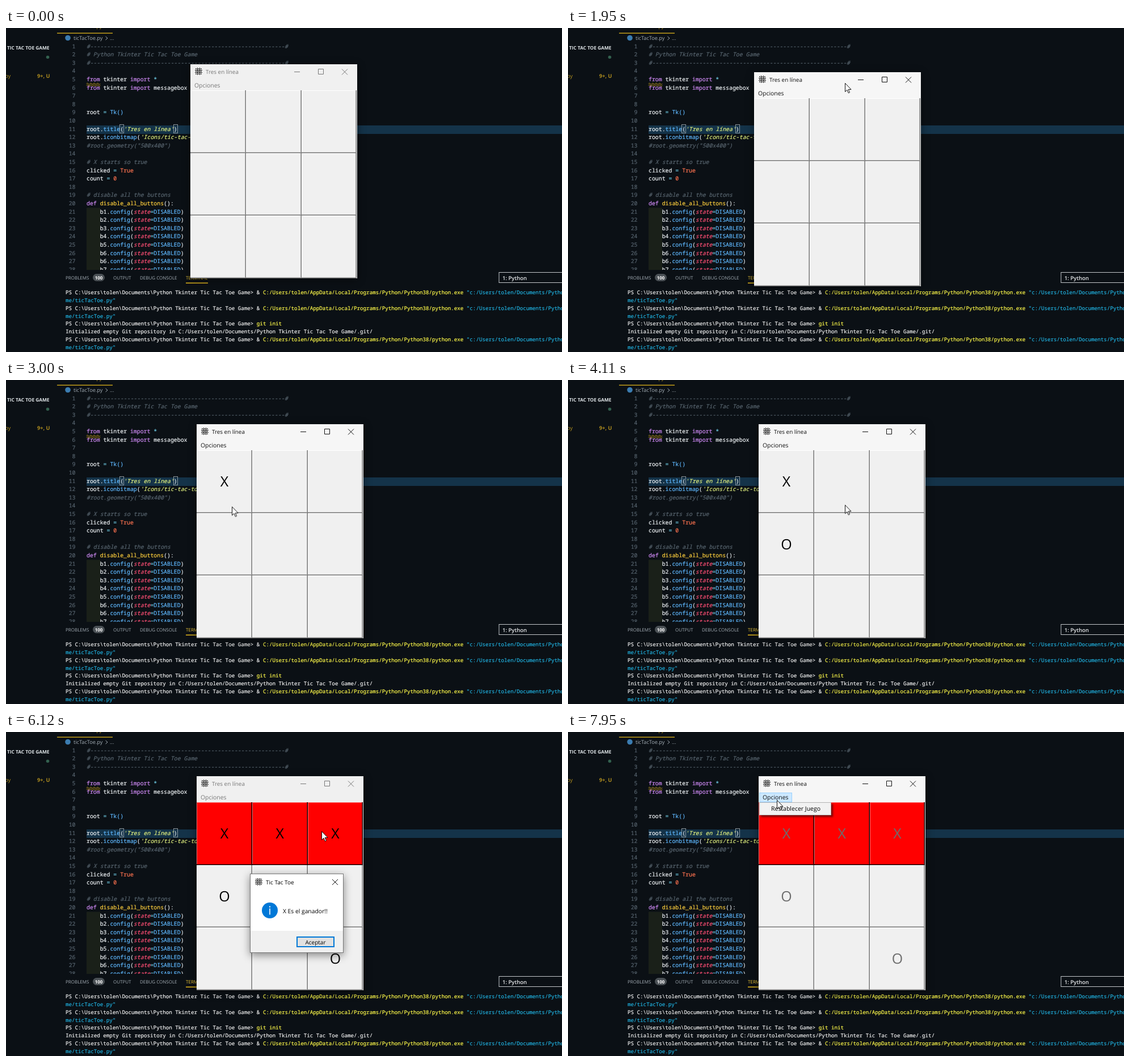
These frames come from a looping animation (980 by 572 pixels, 8 s). An HTML page:

```html
<!DOCTYPE html>
<html lang="es">
<head>
<meta charset="utf-8">
<title>Tres en línea</title>
<style>
html, body { margin: 0; width: 100%; height: 100%; overflow: hidden; background: #0b1015; }
body { position: relative; text-rendering: geometricPrecision; font-family: "Open Sans", "Noto Sans", sans-serif; }
svg, pre, .box { position: absolute; margin: 0; }
svg { left: 0; top: 0; overflow: visible; }
pre { font-family: "Noto Sans Mono", "DejaVu Sans Mono", monospace; -webkit-text-stroke: .2px; }

/* editor */
.code { font-size: 9.87px; line-height: 14.6px; top: 24.7px; height: 402.3px; overflow: hidden; color: #eef2f5; }
#nums { left: 90px; width: 32.5px; text-align: right; color: #56636e; }
#src { left: 142px; width: 838px; }
.c { color: #58656f; font-style: italic; }
.k { color: #cf8af5; }
.f { color: #5fb8ff; }
.s { color: #e0f07f; font-style: italic; }
.y { color: #ffcf3d; }
.p { color: #ff4f75; font-style: italic; }
.n { color: #ff7350; }
.o { color: #74d6f0; }
.b { outline: 1px solid #8b979f; }

/* terminal */
#term { left: 105px; top: 460px; width: 875px; height: 112px; overflow: hidden; font-size: 9.21px; line-height: 13.85px; color: #f0f0f0; }
#term b { font-weight: 400; color: #fffa4a; }
#term u { text-decoration: none; color: #20b0de; }

/* game window */
.box { left: 0; top: 0; }
#win { width: 293.5px; height: 378px; background: #f0f0f0; box-shadow: 0 3px 14px rgba(0,0,0,.45); animation: drag 8s linear infinite; }
#bar { width: 293.5px; height: 46px; animation: bar 8s step-end infinite; }
#bar svg { fill: currentColor; stroke: none; }
.line { fill: none; stroke: currentColor; }
#board { top: 46px; display: grid; grid: repeat(3, 110.67px) / repeat(3, 97.83px); font-size: 25px; line-height: 111px; text-align: center; animation: fade 8s step-end infinite; }
#board div { box-shadow: inset -1px -1px #757575, inset -2px -2px #b0b0b0, inset 1px 1px #fff; }
#board .r { animation: red 8s step-end infinite; }
#board span, #dlg, #hot, #menu { animation: 8s step-end infinite; }
#board .m1 { animation-name: m1; }
#board .m2 { animation-name: m2; }
#board .m3 { animation-name: m3; }
#board .m4 { animation-name: m4; }
#board .m9 { animation-name: m9; }

#hot { left: 1px; top: 29px; width: 56px; height: 15px; background: #cce8ff; border: 1px solid #99d1ff; animation-name: hot; }
#menu { left: 1px; top: 46px; width: 125px; height: 21px; background: #f2f2f2; border: 1px solid #b4b4b4; box-shadow: 3px 3px 3px rgba(0,0,0,.5); animation-name: menu; }

#dlg { left: 430px; top: 250px; width: 163px; height: 138px; border: 1px solid #777; background: linear-gradient(#fff 100px, #f0f0f0 0); box-shadow: 0 4px 14px rgba(0,0,0,.45); animation-name: dlg; }
#ok { left: 81px; top: 110px; width: 63px; height: 15px; border: 2px solid #0078d7; background: #e1e1e1; font-size: 10px; line-height: 16px; text-align: center; animation: ok 8s step-end infinite; }
#cur { width: 12px; height: 19px; animation: move 8s linear infinite; }

@keyframes drag {
  0%, 15% { transform: translate(325px, 64px); }
  23.6%, 24.5% { transform: translate(328px, 78px); }
  27.5%, 100% { transform: translate(336px, 78px); }
}
@keyframes bar {
  0%, 75.4% { color: #777; background: #f0f0f0; }
  13.9%, 88.5%, 100% { color: #111; background: #f6f6f6; }
}
@keyframes fade { 0% { color: #000; } 88.5%, 100% { color: #6d6d6d; } }
@keyframes red {
  0% { background: #f0f0f0; }
  73.2%, 100% { background: #f00; box-shadow: inset -1px -1px #000, inset -2px -2px #900, inset 1px 1px #ff7070; }
}
@keyframes m1 { 0% { opacity: 0; } 32.2%, 100% { opacity: 1; } }
@keyframes m4 { 0% { opacity: 0; } 43.8%, 100% { opacity: 1; } }
@keyframes m2 { 0% { opacity: 0; } 54%, 100% { opacity: 1; } }
@keyframes m9 { 0% { opacity: 0; } 65.3%, 100% { opacity: 1; } }
@keyframes m3 { 0% { opacity: 0; } 73%, 100% { opacity: 1; } }
@keyframes dlg { 0%, 88.5%, 100% { opacity: 0; } 75.4% { opacity: 1; } }
@keyframes ok { 0% { background: #e1e1e1; } 85.5%, 100% { background: #e5f1fb; } }
@keyframes hot { 0% { opacity: 0; } 96%, 100% { opacity: 1; } }
@keyframes menu { 0% { opacity: 0; } 97.9%, 100% { opacity: 1; } }
@keyframes move {
  0%, 2.6% { transform: translate(990px, 580px); }
  2.63% { transform: translate(966px, 556px); }
  3.4% { transform: translate(800px, 330px); }
  4.1% { transform: translate(560px, 130px); }
  4.9% { transform: translate(384px, 62px); }
  5.5% { transform: translate(440px, 48px); }
  6%, 15% { transform: translate(485px, 83px); }
  23.6%, 24.5% { transform: translate(488px, 97px); }
  27.5%, 28.5% { transform: translate(496px, 97px); animation-timing-function: ease-in-out; }
  31.5%, 36% { transform: translate(380px, 165px); }
  37.5% { transform: translate(398px, 223px); }
  39.4%, 45.5% { transform: translate(405px, 277px); }
  51% { transform: translate(488px, 229px); }
  51.4% { transform: translate(488px, 220px); }
  53.5%, 57% { transform: translate(488px, 200px); animation-timing-function: ease-in-out; }
  64%, 67.4% { transform: translate(572px, 390px); }
  70.1% { transform: translate(562px, 244px); }
  72%, 77.6% { transform: translate(556px, 175px); }
  78.3% { transform: translate(552px, 164px); }
  82% { transform: translate(432px, 290px); }
  86.5%, 88.8% { transform: translate(545px, 372px); animation-timing-function: ease-in-out; }
  96.4%, 100% { transform: translate(368px, 120px); }
}
</style>
</head>
<body>
<svg width="980" height="572" fill="#a3adb5">
  <defs>
    <g id="icon" fill="none" stroke="#222">
      <path d="M4.5 0V13M8.5 0V13M0 4.5H13M0 8.5H13"/>
      <path d="M1 2H12M1 6.5H12M1 11H12" stroke-width="1.6" stroke-dasharray="2 2.4"/>
    </g>
  </defs>
  <path fill="#143349" d="M142 172H980V187H142Z"/>
  <path fill="#1a2019" d="M142 317.5H166V427H142Z"/>
  <path fill="#e5b91c" d="M90 8.5H188V9.7H90ZM317 449.5H356V451H317Z"/>
  <text x="118" y="-.3" font-size="9.2" fill="#b8961f">ticTacToe.py</text>
  <circle cx="109" cy="17.5" r="4.8" fill="#3b7cb0"/>
  <text x="119" y="21" font-size="9.2">ticTacToe.py</text>
  <path d="M175.5 15L179 18 175.5 21" fill="none" stroke="#a3adb5"/>
  <text x="183" y="21" font-size="9.2">...</text>
  <text x="2" y="38.2" font-size="8.3" font-weight="700" fill="#e0e5e8">TIC TAC TOE GAME</text>
  <circle cx="73.5" cy="51.5" r="2.8" fill="#33614f"/>
  <g fill="#b08e1f">
    <text x="-2" y="88" font-size="9.4">py</text>
    <text x="55" y="88.3" font-size="9.2" font-weight="700">9+, U</text>
  </g>
  <g font-size="8">
    <text x="105" y="444">PROBLEMS</text>
    <text x="189" y="444">OUTPUT</text>
    <text x="236" y="444">DEBUG CONSOLE</text>
    <text x="317" y="444" fill="#f0c93a">TERMINAL</text>
    <rect x="153" y="434" width="21" height="13" rx="6.5" fill="#4b5156"/>
    <text x="163.5" y="443.5" text-anchor="middle" font-weight="700" fill="#fff">100</text>
  </g>
  <rect x="869" y="431.5" width="120" height="18" fill="none" stroke="#c4c8cb"/>
  <text x="875" y="444.5" font-size="9.5" font-weight="600" fill="#e8eaec">1: Python</text>
</svg>

<pre class="code" id="nums"></pre>
<pre class="code" id="src"><span class="c">#----------------------------------------------------------#
# Python Tkinter Tic Tac Toe Game
#----------------------------------------------------------#</span>

<span class="k">from</span> tkinter <span class="k">import</span> <span class="o">*</span>
<span class="k">from</span> tkinter <span class="k">import</span> messagebox


root <span class="o">=</span> <span class="f">Tk()</span>

root.<span class="f">title</span><span class="b">(</span><span class="s">'Tres en línea'</span><span class="b">)</span>
root.<span class="f">iconbitmap</span>(<span class="s">'Icons/tic-tac-toe.ico'</span>)
<span class="c">#root.geometry("500x400")</span>

<span class="c"># X starts so true</span>
clicked <span class="o">=</span> <span class="n">True</span>
count <span class="o">=</span> <span class="n">0</span>

<span class="c"># disable all the buttons</span>
<span class="k">def</span> <span class="y">disable_all_buttons</span>():
</pre>
<svg width="980" height="572" fill="none" stroke="#d9ae1c">
  <path id="wave" d="M142 98.5q1.5-3 3 0t3 0 3 0 3 0 3 0 3 0 3 0 3 0"/>
  <use href="#wave" y="3"/>
</svg>

<pre id="term"></pre>

<div class="box" id="win">
  <div class="box" id="bar">
    <div class="box" id="hot"></div>
    <svg width="293" height="46">
      <use href="#icon" x="8" y="6"/>
      <text x="27" y="17" font-size="9.9">Tres en línea</text>
      <path class="line" d="M183 13.5H193M225.5 8.5h9v9h-9ZM267 8.5l10 10M277 8.5l-10 10"/>
      <text x="7" y="40.5" font-size="10.4">Opciones</text>
    </svg>
  </div>
  <div class="box" id="board">
    <div class="r"><span class="m1">X</span></div><div class="r"><span class="m2">X</span></div><div class="r"><span class="m3">X</span></div>
    <div><span class="m4">O</span></div><div></div><div></div>
    <div></div><div></div><div><span class="m9">O</span></div>
  </div>
  <div class="box" id="menu">
    <svg width="125" height="21"><text x="20" y="14" font-size="10.5">Restablecer Juego</text></svg>
  </div>
</div>

<div class="box" id="dlg">
  <svg width="163" height="138">
    <use href="#icon" x="8" y="7"/>
    <text x="27" y="17.5" font-size="10">Tic Tac Toe</text>
    <path d="M144 9l10 10M154 9l-10 10" stroke="#111"/>
    <circle cx="34" cy="64" r="14" fill="#0078d7"/>
    <path d="M33.2 60.5h1.6v11h-1.600ZM33 56.5h2v2h-2Z" fill="#fff"/>
    <text x="57" y="68.5" font-size="10.3">X Es el ganador!!</text>
  </svg>
  <div class="box" id="ok">Aceptar</div>
</div>

<svg id="cur" width="12" height="19">
  <path d="M.5.5V15.5L4 12.300 6.300 17.800 8.500 16.800 6.200 11.500H11Z" fill="#fff" stroke="#111"/>
</svg>

<script>
const $ = id => document.getElementById(id);
$('nums').textContent = Array.from({ length: 28 }, (_, i) => i + 1).join('\n');
$('src').innerHTML += [1, 2, 3, 4, 5, 6, 6, 7].map(n =>
  `    b${n}.<span class="f">config</span>(<span class="p">state</span><span class="o">=</span><span class="f">DISABLED</span>)`
).join('\n');

const home = 'Users/tolen/';
const folder = 'Documents/Python Tkinter Tic Tac Toe Game';
const prompt = `PS C:\\${(home + folder).replace(/\//g, '\\')}&gt; `;
const run = `${prompt}&amp; <b>C:/${home}AppData/Local/Programs/Python/Python38/python.exe</b> ` +
  `<u>"c:/${home}${folder.slice(0, -2)}\nme/ticTacToe.py"</u>`;
$('term').innerHTML = [run, run, `${prompt}<b>git init</b>`,
  `Initialized empty Git repository in C:/${home}${folder}/.git/`, run].join('\n');
</script>
</body>
</html>
```
